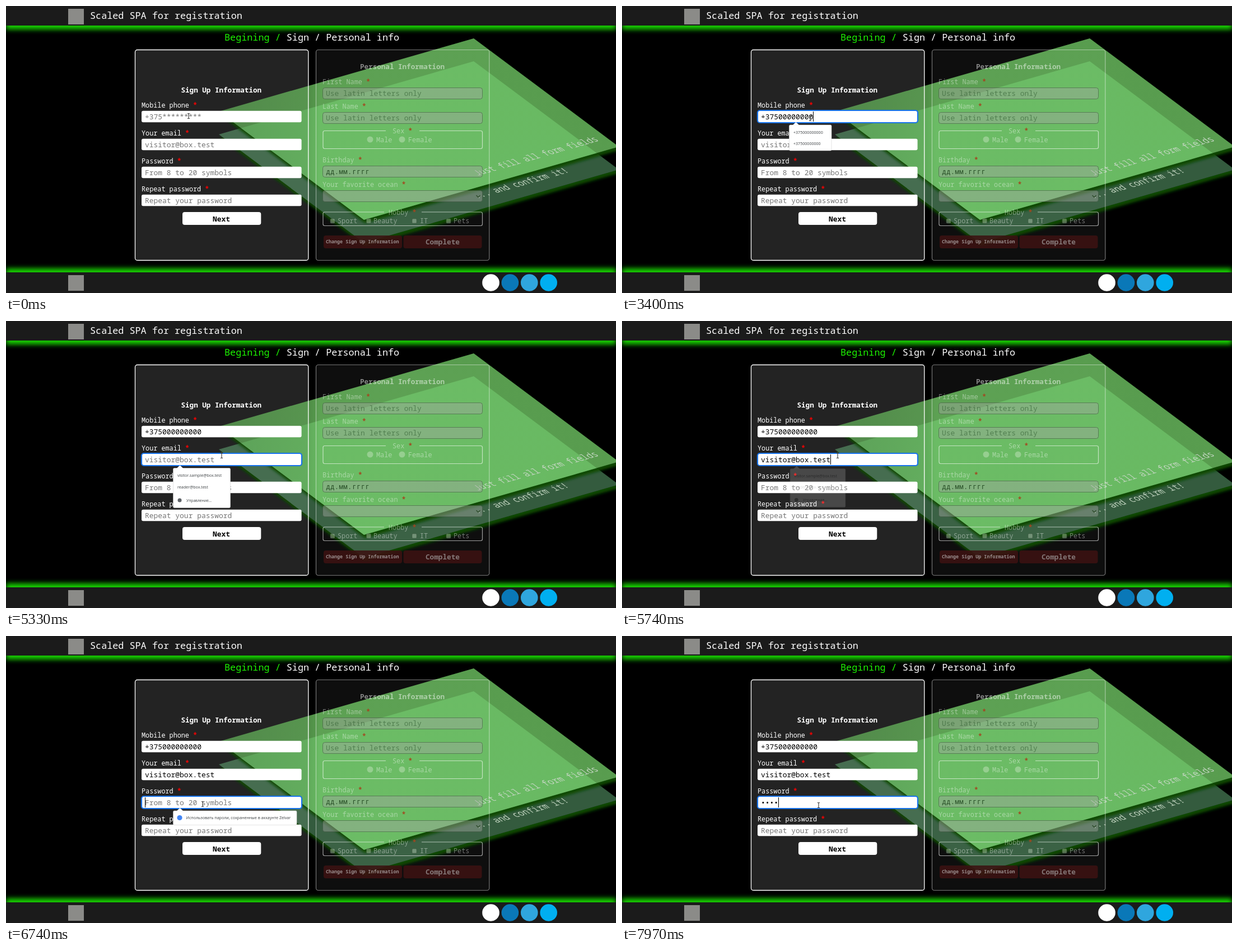
An HTML page that plays this animation: 1089 px wide and 514 px high, repeating every 8 s.

```html
<!DOCTYPE html>
<html lang="en">
<head>
<meta charset="utf-8">
<title>Registration form</title>
<style>
  html, body { margin: 0; width: 100%; height: 100%; overflow: hidden; background: #000; }
  svg { display: block; width: 100vw; height: 100vh; }
  text { font-family: "Noto Sans Mono", "DejaVu Sans Mono", monospace; }
  .ui { font-family: "Open Sans", "Noto Sans", sans-serif; }
  .b { font-weight: 700; }
</style>
</head>
<body>
<svg id="stage" viewBox="0 0 1089 514" preserveAspectRatio="none">
  <defs>
    <filter id="glow" x="-5%" y="-100%" width="110%" height="300%"><feGaussianBlur stdDeviation="4"/></filter>
    <filter id="soft"><feGaussianBlur stdDeviation="2.5"/></filter>
    <linearGradient id="near" gradientUnits="userSpaceOnUse" x1="380" y1="0" x2="560" y2="0">
      <stop offset="0" stop-color="#66b85c"/>
      <stop offset=".86" stop-color="#70ca64"/>
      <stop offset="1" stop-color="#82e674"/>
    </linearGradient>
  </defs>
</svg>
<script>
const NS = "http://www.w3.org/2000/svg";
const LOOP = 8000;
const CHAR = 7.77;          // advance of one input character
const INPUT_SIZE = 12.95;
const LABEL_SIZE = 11.8;
const PHONE = "+375000000000";
const EMAIL = "visitor@box.test";
const stage = document.getElementById("stage");

function el(tag, attrs, parent = stage) {
  const node = document.createElementNS(NS, tag);
  for (const key in attrs) node.setAttribute(key, attrs[key]);
  parent.appendChild(node);
  return node;
}
const group = (attrs = {}, parent = stage) => el("g", attrs, parent);

function rect(x, y, width, height, rx, fill, more = {}, parent = stage) {
  return el("rect", { x, y, width, height, rx, fill, ...more }, parent);
}
function dot(cx, cy, r, fill, parent = stage) {
  return el("circle", { cx, cy, r, fill }, parent);
}
function label(x, y, size, fill, str, more = {}, parent = stage) {
  const node = el("text", { x, y, "font-size": size, fill, ...more }, parent);
  node.textContent = str;
  return node;
}
function required(x, y, str, fill, star) {
  const node = label(x, y, LABEL_SIZE, fill, str + " ");
  el("tspan", { fill: star, class: "b" }, node).textContent = "*";
}

// Header and footer bars
rect(0, 7, 1089, 35, 0, "#17d000", { filter: "url(#glow)" });
rect(0, 470, 1089, 35, 0, "#17d000", { filter: "url(#glow)" });
rect(0, 0, 1089, 35, 0, "#1b1b1b");
rect(0, 477, 1089, 37, 0, "#1b1b1b");
rect(111, 5, 28, 28, 0, "#8b8b88");
rect(111, 482, 28, 28, 0, "#8b8b88");
label(150, 23, 16.8, "#fff", "Scaled SPA for registration");
["#fff", "#0a78b8", "#2fa6de", "#00aff0"].forEach((c, i) => dot(865.5 + i * 34.4, 495.5, 15.3, c));

const crumbs = label(390, 62, 16.8, "#1cf500", "Begining / ");
el("tspan", { fill: "#fff" }, crumbs).textContent = "Sign / Personal info";

// Panel backs, with the slanted cards lying over them
const panel = (x, fill, more) => rect(x, 78.5, 309.3, 377, 4, fill, more);
panel(230.5, "#232323");
panel(553.5, "#0e0e0e");

function card(id, dy, fill, opacity) {
  const corners = [[835, 58], [1094, 252], [639, 383], [380, 189]].map(([x, y]) => [x, y + dy]);
  const outside = el("clipPath", { id });
  el("path", { d: `M0 0H1089V514H0zM${corners.join("L")}z`, "clip-rule": "evenodd" }, outside);
  const shade = group({ "clip-path": `url(#${id})` });
  el("polygon", {
    points: corners.join(" "), fill: "#0b4a06", transform: "translate(2 6)", filter: "url(#soft)"
  }, shade);
  el("polygon", { points: corners.join(" "), fill, opacity });
}
function slanted(x, y, str) {
  label(0, 0, 15.1, "#c3d6c1", str, { transform: `matrix(.961 -.277 1 .755 ${x} ${y})` });
}
card("below-far", 41, "#6ebe82", .48);
slanted(841, 345, "... and confirm it!");
card("below-near", 0, "url(#near)", .68);
slanted(842, 304, "Just fill all form fields");

// Personal information, dimmed
const PALE = "rgba(255,255,255,.42)", STAR = "#a4461f", INK = "rgba(50,95,50,.6)";
panel(553.5, "none", { stroke: "rgba(255,255,255,.45)", "stroke-width": 1.2 });
label(632, 113, 12.6, "rgba(255,255,255,.5)", "Personal Information", { class: "b" });

function dimField(y, str, ink = INK) {
  rect(565.5, y + .5, 285, 20, 4, "rgba(160,165,158,.45)", { stroke: "rgba(60,80,60,.55)" });
  label(571, y + 15, INPUT_SIZE, ink, str);
}
function fieldset(y, h, gapL, gapR, title, titleX) {
  el("path", {
    d: `M${gapL} ${y}H569q-3 0-3 3v${h - 6}q0 3 3 3H847.5q3 0 3-3v${6 - h}q0-3-3-3H${gapR}`,
    fill: "none", stroke: "rgba(255,255,255,.6)", "stroke-width": 1.2
  });
  required(titleX, y + 4.5, title, PALE, STAR);
}
required(565, 140, "First Name", PALE, STAR);
dimField(146, "Use latin letters only");
required(565, 184, "Last Name", PALE, STAR);
dimField(190, "Use latin letters only");
fieldset(223.5, 32, 678, 738, "Sex", 690);
[[650, "Male"], [707, "Female"]].forEach(([x, str]) => {
  dot(x, 239, 5.5, "rgba(215,235,210,.4)");
  label(x + 11, 243.5, LABEL_SIZE, PALE, str);
});
required(565, 280, "Birthday", PALE, STAR);
dimField(286, "дд.мм.гггг", "rgba(10,45,10,.75)");
required(565, 324, "Your favorite ocean", PALE, STAR);
dimField(330, "");
el("path", { d: "M839.5 339l3.5 3.5 3.5-3.5", fill: "none", stroke: "#2c4a2a", "stroke-width": 1.3 });
fieldset(369, 24.5, 675, 742, "Hobby", 683);
[[579, "Sport", 592], [643.5, "Beauty", 656], [725, "IT", 739], [786, "Pets", 799]].forEach(([x, str, tx]) => {
  rect(x, 381, 8, 8, 1.5, "rgba(215,235,210,.36)", { stroke: "rgba(60,80,60,.5)" });
  label(tx, 389, LABEL_SIZE, PALE, str);
});
[567, 709.5].forEach(x => rect(x, 411, 140, 23, 4, "rgba(60,18,18,.88)"));
label(571, 425, 8.4, "#9a8d8d", "Change Sign Up Information", { class: "b" });
label(749, 427, 12.7, "#857878", "Complete", { class: "b" });

// Sign up form
panel(230.5, "none", { stroke: "#fff", "stroke-width": 1.3 });
label(312.5, 155, 12.6, "#fff", "Sign Up Information", { class: "b" });

const fields = [
  ["Mobile phone", "+375*********"],
  ["Your email", EMAIL],
  ["Password", "From 8 to 20 symbols"],
  ["Repeat password", "Repeat your password"]
].map(([name, hint], i) => {
  const y = 188 + i * 50;
  required(242, y - 6.5, name, "#fff", "#f00");
  rect(242, y - .2, 285.6, 20.5, 3, "#fff");
  return { y, hint, text: label(248, y + 14.8, INPUT_SIZE, "#757575", hint) };
});
rect(315, 369, 140.3, 23, 4, "#fff");
label(369, 385.5, 12.9, "#000", "Next", { class: "b" });

const ring = rect(242, 187, 286, 22, 4, "none", { stroke: "#1672ea", "stroke-width": 2.2 });
const caret = rect(248, 189, 1, 18, 0, "#000");

// Suggestion boxes
function popup(x, y, w, h) {
  const g = group();
  rect(x, y, w, h, 2, "#fff", { stroke: "#d4d4d4", "stroke-width": .6 }, g);
  el("path", { d: `M${x + 6} ${y + .4}l6-5.4 6 5.4z`, fill: "#fff" }, g);
  return { g, cx: x + w / 2, cy: y + h / 2 };
}
function hint(x, y, str, size, box) {
  label(x, y, size, "#3c4043", str, { class: "ui" }, box.g);
}
const phoneBox = popup(298.5, 213, 75.5, 46);
hint(306, 228.5, PHONE, 7.1, phoneBox);
hint(306, 249, PHONE.slice(0, -1), 7.1, phoneBox);

const emailBox = popup(298.5, 263.5, 102, 71);
hint(306, 279, "visitor.sample@box.test", 7.1, emailBox);
hint(306, 300, "reader@box.test", 7.1, emailBox);
dot(310, 321, 3.5, "#5f6368", emailBox.g);
hint(322, 323.5, "Управление...", 6.7, emailBox);

const passBox = popup(298.5, 313, 220.5, 25.5);
dot(310, 325.5, 4.6, "#4285f4", passBox.g);
hint(321.5, 328, "Использовать пароли, сохраненные в аккаунте Zelvar", 7.1, passBox);

// Text pointer
const pointer = group();
const beam = "M-2 -4.5H-.8L0-4 .8-4.5H2M0-4V4M-2 4.5H-.8L0 4 .8 4.5H2";
el("path", { d: beam, fill: "none", stroke: "rgba(255,255,255,.35)", "stroke-width": 2 }, pointer);
el("path", { d: beam, fill: "none", stroke: "#222", "stroke-width": 1 }, pointer);

// Timeline: [time, x, y]
const path = [
  [0, 326, 197], [609, 326, 197], [610, 326, 199], [3280, 326, 200], [3400, 336, 201],
  [4060, 388, 239], [4250, 388, 240], [4600, 386, 241], [5740, 385, 241], [6130, 364, 278],
  [6310, 364, 278], [6560, 351, 301], [7560, 351, 301], [7790, 351, 304], [7969, 351, 304], [7970, 351, 303]
];
const phoneKeys = [1830, 2090, 2300, 2480, 2720, 2960, 3140, 3280, 3520];
const passKeys = [7120, 7360, 7560, 7730];
const PASTE = 5540;
const count = (keys, t) => keys.filter(k => t >= k).length;
const within = (t, a, b) => t >= a && t < b;

function pointerAt(t) {
  const i = path.findIndex(p => p[0] > t);
  if (i < 0) return path[path.length - 1].slice(1);
  const [t0, x0, y0] = path[i - 1], [t1, x1, y1] = path[i];
  const k = (t - t0) / (t1 - t0);
  return [x0 + (x1 - x0) * k, y0 + (y1 - y0) * k];
}
function fade(box, t, open, close) {
  const a = t < open ? 0 : Math.max(0, Math.min(1, 1 - (t - close) / 200));
  const s = .96 + .04 * a;
  box.g.setAttribute("opacity", a);
  box.g.setAttribute("transform",
    `translate(${box.cx} ${box.cy}) scale(${s}) translate(${-box.cx} ${-box.cy})`);
}

function draw(t) {
  const typed = count(phoneKeys, t);
  const values = [
    typed ? PHONE.slice(0, typed + 4) : "",
    t >= PASTE ? EMAIL : "",
    "•".repeat(count(passKeys, t)),
    ""
  ];
  fields.forEach((f, i) => {
    f.text.textContent = values[i] || f.hint;
    f.text.setAttribute("fill", values[i] ? "#000" : "#757575");
  });

  const focus = count([780, 4610, 6560], t) - 1;
  ring.setAttribute("visibility", focus < 0 ? "hidden" : "visible");
  const blinkOff = within(t, 1160, 1590) || within(t, 5130, PASTE);
  caret.setAttribute("visibility", focus < 0 || blinkOff ? "hidden" : "visible");
  if (focus >= 0) {
    const y = fields[focus].y;
    ring.setAttribute("y", y - 1);
    caret.setAttribute("y", y + 1);
    caret.setAttribute("x", Math.round(248 + values[focus].length * CHAR));
  }

  fade(phoneBox, t, 780, 3520);
  fade(emailBox, t, 4670, 5575);
  fade(passBox, t, 6620, 7140);
  pointer.setAttribute("transform", `translate(${pointerAt(t).map(v => Math.round(v)).join(" ")})`);
}

const start = performance.now();
function tick() {
  draw((performance.now() - start) % LOOP);
  requestAnimationFrame(tick);
}
tick();
</script>
</body>
</html>
```
